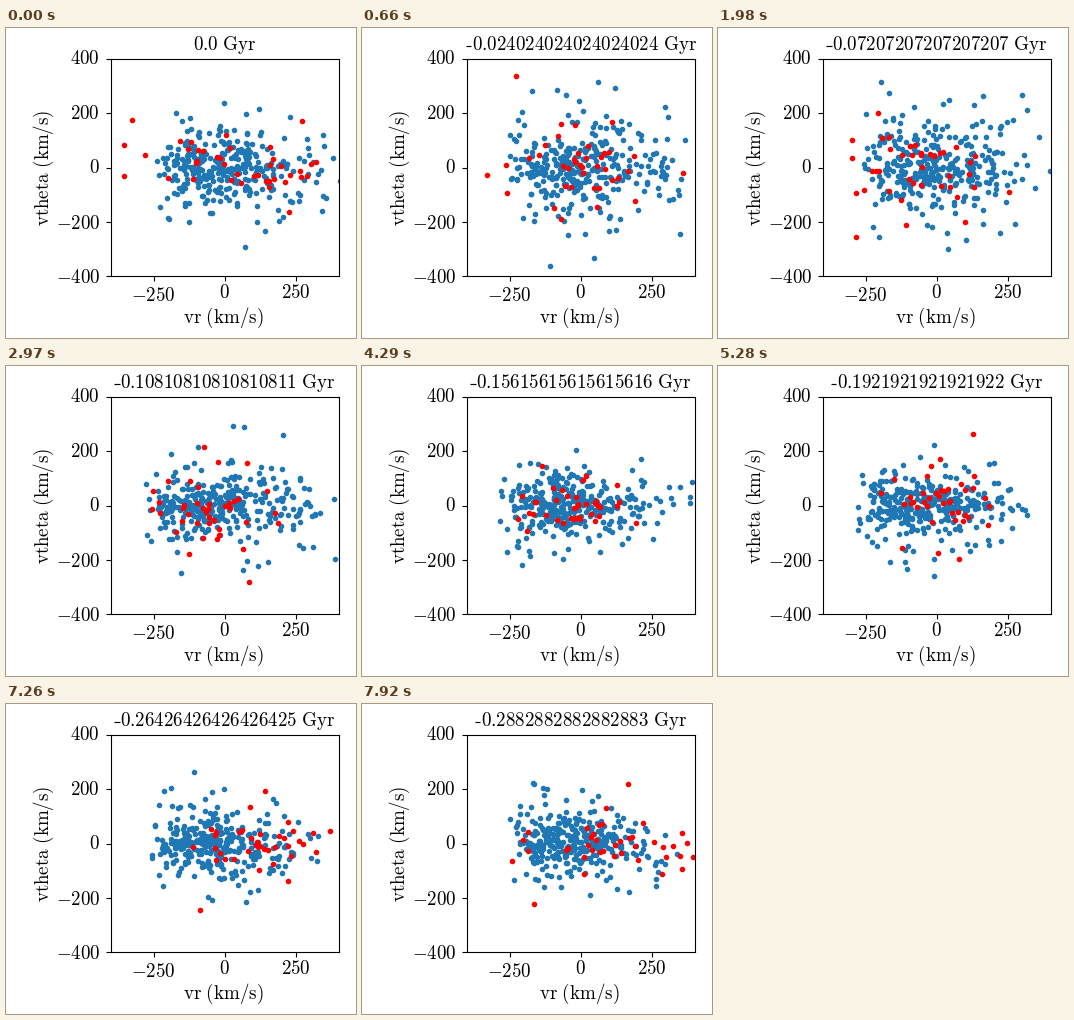
A matplotlib script for the animation above (8 s loop, 350 by 310 pixels).

```python
import matplotlib.pyplot as plt
import numpy as np
from matplotlib.animation import FuncAnimation
from matplotlib.lines import Line2D

WIDTH, HEIGHT = 350, 310
LOOP_MS, INTERVAL, STEP_MS = 8000, 40, 330
EM = 19.0  # font size in pixels

plt.rcParams["mathtext.fontset"] = "cm"
rng = np.random.default_rng(5)
times = np.linspace(0, -3, 1000)


def wave(step, peak, period):
    return np.cos(2 * np.pi * (step - peak) / period)


def vtheta_spread(step):
    return 66 + 36 * np.exp(-((step - 4) / 4) ** 2)


# Each gives the mean of vr and the spreads of vr and vtheta
def blue_bulk(step):
    return -15 + 28 * wave(step, 3, 30), 137 + 14 * wave(step, 7, 30), vtheta_spread(step)


def red_bulk(step):
    return 20 - 85 * wave(step, 7, 34), 130 + 40 * wave(step, 0, 26), vtheta_spread(step)


class Swarm:
    """Stars that swing about a drifting mean with a changing spread."""

    def __init__(self, count, bulk, skew=0):
        self.bulk, self.skew = bulk, skew
        self.radius = np.stack([np.minimum(rng.rayleigh(1, count), 2.4),
                                np.minimum(rng.gamma(2, 0.577, count), 4)])
        self.phase = rng.uniform(0, 2 * np.pi, (2, count))
        self.rate = rng.uniform(0.2, 0.6, (2, count))

    def at(self, step):
        vr, vtheta = self.radius * np.cos(self.phase + self.rate * step)
        vr = vr + self.skew * (vr ** 2 - 1)
        mean, vr_spread, spread = self.bulk(step)
        return mean + vr_spread * vr, spread * vtheta


blue_swarm = Swarm(330, blue_bulk, skew=0.12)
red_swarm = Swarm(40, red_bulk)

fig = plt.figure(figsize=(WIDTH / 100, HEIGHT / 100), dpi=100, facecolor="white")
ax = fig.add_axes([105 / WIDTH, 62 / HEIGHT, 228 / WIDTH, 217 / HEIGHT])
ax.set(xlim=(-400, 400), ylim=(-400, 400),
       xticks=[-250, 0, 250], yticks=range(-400, 401, 200))
ax.tick_params(labelbottom=False, labelleft=False)


def label(x, y, text, ha="center", **kwargs):
    """Place roman text with its baseline at pixel (x, y), y measured down."""
    return fig.text(x / WIDTH, 1 - y / HEIGHT, rf"$\mathrm{{{text}}}$",
                    fontsize=EM * 0.72, ha=ha, va="baseline", **kwargs)


for value in (-250, 0, 250):
    label(218.3 + 0.285 * value, 273 if value < 0 else 270.5, value)
for value in range(-400, 401, 200):
    y = 139.5 - 0.27125 * value
    label(94.2, y + (7 if value < 0 else 5.5), value, ha="right")
label(217.7, 294.5, r"vr\ (km/s)")
label(42.5, 140, r"vtheta\ (km/s)", rotation=90, rotation_mode="anchor")

title = label(219, 22.5, "")
hyphen = Line2D([], [], color="black", lw=0.85, solid_capstyle="butt",
                transform=fig.transFigure)
fig.add_artist(hyphen)
blue, = ax.plot([], [], ".", color="#1f77b4")
red, = ax.plot([], [], ".", color="red")


def set_title(value):
    number = str(abs(value))
    title.set_text(rf"$\mathrm{{{number}\ Gyr}}$")
    negative = value < 0
    title.set_x((219 + 0.167 * EM * negative) / WIDTH)
    hyphen.set_visible(negative)
    width = EM * (0.333 + 0.278 + 0.5 * (len(number) - 1) + 2.038)
    left = 219 - width / 2
    y = 1 - (22.5 - 0.216 * EM) / HEIGHT
    hyphen.set_data([left / WIDTH, (left + 0.28 * EM) / WIDTH], [y, y])


def update(frame):
    step = (frame * INTERVAL + 30) // STEP_MS
    if step in (7, 14):  # these two steps hold the previous picture
        step -= 1
    blue.set_data(*blue_swarm.at(step))
    red.set_data(*red_swarm.at(step))
    set_title(float(times[4 * step]))
    return blue, red, title, hyphen


anim = FuncAnimation(fig, update, frames=LOOP_MS // INTERVAL,
                     interval=INTERVAL, repeat=True, repeat_delay=0)
plt.show()
```
